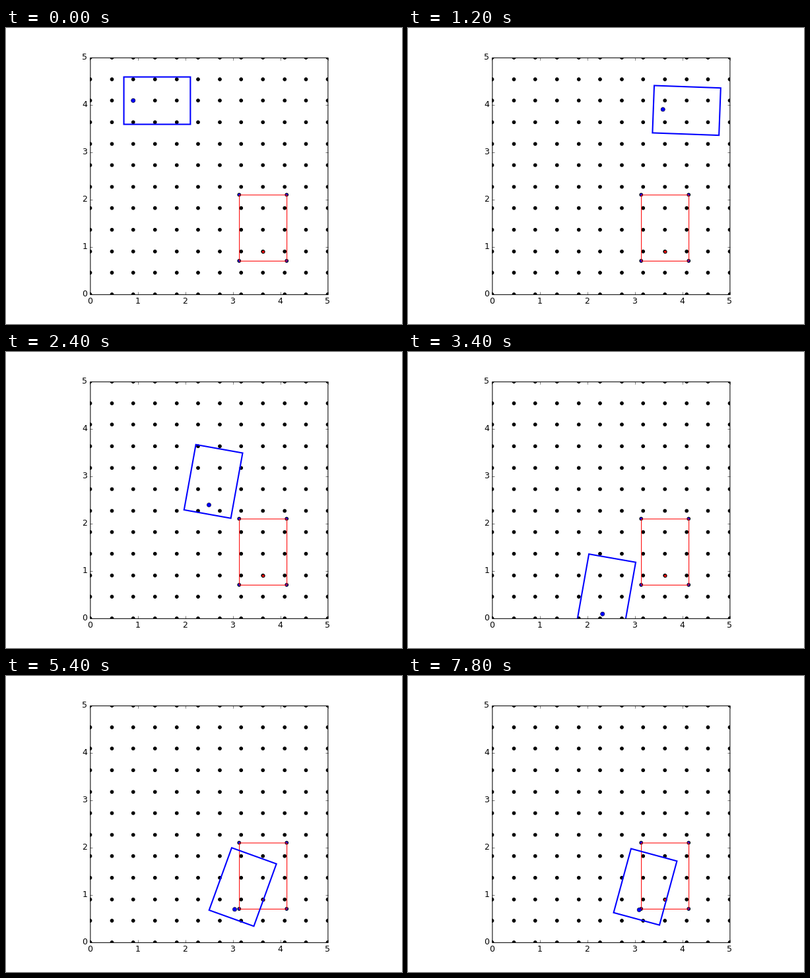
Animation, 600 px wide and 450 px high, one loop 8 s. Source, as a matplotlib script:

```python
import numpy as np
import matplotlib.pyplot as plt
from matplotlib.animation import FuncAnimation
from matplotlib.collections import PatchCollection
from matplotlib.patches import Circle, Polygon, Rectangle

plt.style.use("classic")
plt.rcParams["font.family"] = "DejaVu Sans"

FRAMES, INTERVAL = 40, 200
SIZE, CELLS = 5.0, 11
STEP = SIZE / CELLS                # distance driven per frame
REAR, FRONT, HALF = 0.2, 1.2, 0.5  # car extents around its reference point
UNIT = 72                          # pixels per data unit
FINE = 96                          # marks sit on a finer pixel lattice
HALF_PIX = np.array([0.5, -0.5]) / FINE

START = (2 * STEP, 9 * STEP, 0)
GOAL = (8 * STEP, 2 * STEP, 90)

# Manoeuvres: steps (negative is reverse) and the pose reached (x, y, degrees).
MOVES = [
    (3, (2.26, 4.03, 16)),
    (3, (3.592, 3.903, -2.1)),
    (1, (4.045, 3.955, 14.3)),
    (-5, (2.504, 2.400, 79.8)),
    (-5, (2.32, 0.09, 80)),
    (4, (3.259, 1.582, 65.4)),
    (-2, (2.998, 0.708, 66)),
]
REST = (3.091, 0.690, 74.8)
SETTLE = 8.5                       # frames of rocking until the car rests


def unit(degrees):
    a = np.radians(degrees)
    return np.array([np.cos(a), np.sin(a)])


def hermite(a, b, steps, t):
    """Pose at t on a smooth curve that leaves a and reaches b along their headings."""
    p, q = np.array(a[:2]), np.array(b[:2])
    u, v = unit(a[2]) * steps * STEP, unit(b[2]) * steps * STEP
    x, y = (p + u * t + (3 * (q - p) - 2 * u - v) * t**2
            + (2 * (p - q) + u + v) * t**3)
    dx, dy = np.sign(steps) * (u + 2 * (3 * (q - p) - 2 * u - v) * t
                               + 3 * (2 * (p - q) + u + v) * t**2)
    return x, y, np.degrees(np.arctan2(dy, dx))


def rock(n):
    """Pose n frames into the back and forth: ahead on odd n, back on even n."""
    a, b = np.array(MOVES[-1][1]), np.array(REST)
    x, y, heading = a + (b - a) * min(1, n / SETTLE)
    dx, dy = unit(heading) * STEP * (n % 2)
    return x + dx, y + dy, heading


def pose(i):
    begin = START
    for steps, end in MOVES:
        if i < abs(steps):
            return hermite(begin, end, steps, i / abs(steps))
        i -= abs(steps)
        begin = end
    return rock(i)


def corners(x, y, heading):
    along = unit(heading)
    side = unit(heading + 90)
    return np.array([(x, y) + along * f + side * s for f, s in
                     [(-REAR, -HALF), (FRONT, -HALF), (FRONT, HALF), (-REAR, HALF)]])


def lattice(p):
    return np.round(np.asarray(p) * FINE) / FINE


def disc(p, points=20 ** 0.5):
    return Circle(lattice(p), points / 2 * 75 / 72 / UNIT)


def add_discs(places, color):
    ax.add_collection(PatchCollection([disc(p) for p in places], facecolor=color,
                                      edgecolor="k", linewidth=1, zorder=1))


fig = plt.figure(figsize=(8, 6), dpi=75, facecolor="white")
ax = fig.add_subplot(111, aspect="equal")
ax.set_xlim(0, SIZE)
ax.set_ylim(0, SIZE)

# A softer frame half a fine pixel off stands in for the spines.
for spine in ax.spines.values():
    spine.set_visible(False)
ax.add_patch(Rectangle(HALF_PIX, SIZE, SIZE, fill=False, lw=1, snap=False,
                       clip_on=False, zorder=4))

ticks = np.linspace(0, SIZE, CELLS + 1)
add_discs([(x, y) for y in ticks for x in ticks], "k")

goal_box = corners(*GOAL)
add_discs([GOAL[:2]], "r")
add_discs(goal_box, "b")
ax.add_patch(Polygon(lattice(goal_box) + HALF_PIX, fill=False, edgecolor="r",
                     lw=1, snap=False, zorder=2))

car = ax.add_patch(Polygon(corners(*START), fill=False, edgecolor="b", lw=2,
                           joinstyle="miter", snap=False, zorder=3))
dot = ax.add_patch(disc(START[:2], 6))
dot.set(facecolor="b", edgecolor="k", linewidth=0.5, zorder=3)


def update(i):
    x, y, heading = pose(i)
    car.set_xy(corners(x, y, heading))
    dot.center = lattice((x, y))
    return car, dot


anim = FuncAnimation(fig, update, frames=FRAMES, interval=INTERVAL, repeat=True)
plt.show()
```
